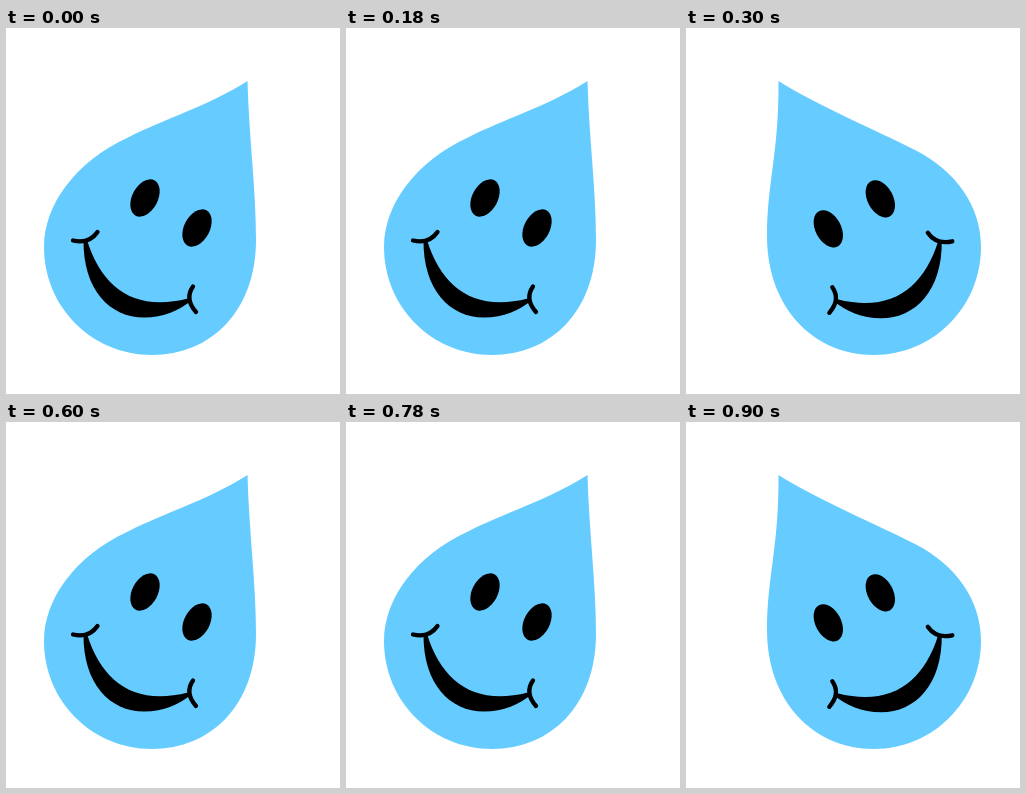
These frames come from a looping animation (334 px wide and 366 px high, 1200 ms). An HTML page:

```html
<!DOCTYPE html>
<html lang="en">
<head>
<meta charset="utf-8">
<title>Swaying water drop</title>
<style>
  html, body { margin: 0; width: 100%; height: 100%; overflow: hidden; background: #fff; }
  svg { display: block; width: 100%; height: 100%; }
  .tick { fill: none; stroke: #000; stroke-width: 4.3; stroke-linecap: round; }
</style>
</head>
<body>
<svg viewBox="0 0 334 366">
  <path id="body" fill="#66ccff"/>
  <g id="face">
    <ellipse rx="12.8" ry="20" transform="translate(139 170) rotate(28)"/>
    <ellipse rx="12.8" ry="20" transform="translate(191 200) rotate(28)"/>
    <path d="M77.5 212C77 262 104 289.5 138 289.5C158 289.5 173 282 185 273L182 270.5C128 284 96 260 81 212Z"/>
    <path class="tick" d="M67 212.5C78 215 86 212 91.5 204"/>
    <path class="tick" d="M187 258.5C181 267 183 276 190 284"/>
  </g>
</svg>
<script>
  const STEP = 300;
  const poses = [
    {
      body: 'M241.5 53C243 110 250 160 250 212C250 283 205 327 146 327C86 327 38 279 38 219' +
            'C38 177 69 134 122 109.5C158 91 200 79 241.5 53Z',
      face: ''
    },
    {
      body: 'M92.5 53C93 125 81 155 81 208C81 278 126 327 188 327C247 327 295 279 295 219' +
            'C295 178 270 143 229 122C190 102 130 77 92.5 53Z',
      face: 'translate(333.3 0.8) scale(-1 1)'
    }
  ];
  const body = document.getElementById('body');
  const face = document.getElementById('face');
  const start = performance.now();

  // The drop leans right, then left, with a hard change on every step.
  function draw(now) {
    const step = Math.floor(Math.max(0, now - start) / STEP);
    const pose = poses[step % poses.length];
    body.setAttribute('d', pose.body);
    face.setAttribute('transform', pose.face);
    requestAnimationFrame(draw);
  }
  draw(start);
</script>
</body>
</html>
```
